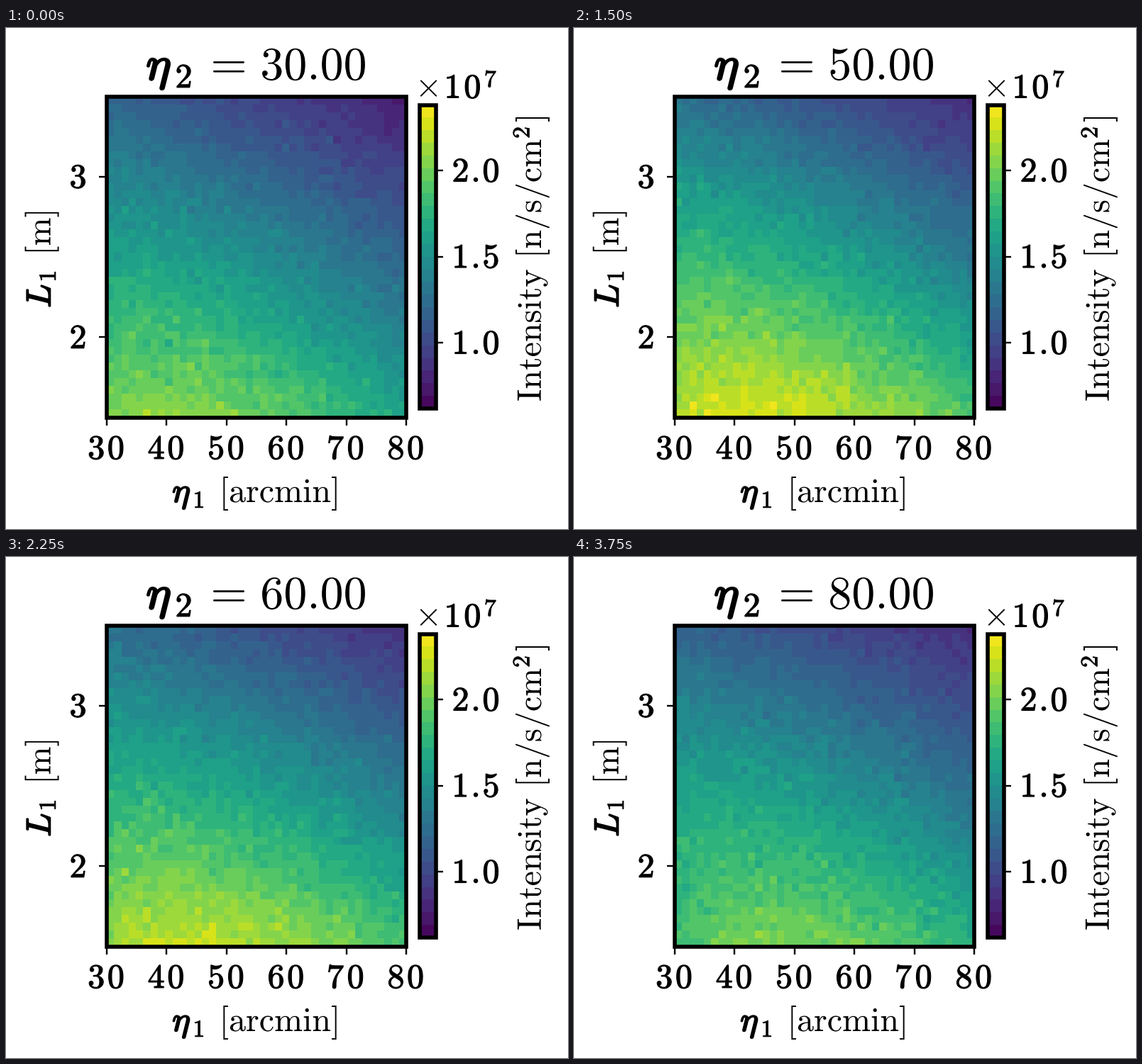
A matplotlib script that plays this animation: 792 px wide and 707 px high, repeating every 4.5 s.

```python
import matplotlib.pyplot as plt
import numpy as np
from matplotlib.animation import FuncAnimation
from matplotlib.colors import ListedColormap
from matplotlib.patches import PathPatch, Rectangle
from matplotlib.textpath import TextPath
from matplotlib.transforms import Affine2D

plt.rcParams["mathtext.fontset"] = "cm"

W, H, DPI = 792, 707, 100
PX = 72 / DPI                      # one pixel in points
EM, TITLE_EM, SUB_EM = 48, 66, 34
CELLS, BANDS = 41, 24
LEFT, RIGHT, TOP, BOTTOM = 142, 564.2, 96.5, 549.5
BAR = (583, 605.5, 108.5, 537)

# eta_2: levels along the left edge, along the right edge, height of the ridge
LEVELS = {
    30: ((.78, .565, .32), (.57, .32, .08), .11),
    40: ((.86, .63, .34), (.66, .37, .12), .12),
    50: ((.86, .66, .37), (.72, .40, .12), .13),
    60: ((.82, .62, .36), (.70, .40, .13), .13),
    70: ((.74, .58, .34), (.70, .38, .13), .13),
    80: ((.66, .55, .31), (.64, .36, .12), .15),
}
ETAS = list(LEVELS)

fig = plt.figure(figsize=(W / DPI, H / DPI), dpi=DPI, facecolor="white")
ax = fig.add_axes([0, 0, 1, 1])
ax.set_xlim(0, W)
ax.set_ylim(H, 0)
ax.axis("off")


def ink(path, stroke=0):
    return ax.add_patch(PathPatch(path, fc="black", lw=stroke * PX, zorder=4,
                                  ec="black" if stroke else "none"))


def text_path(s, x, y, size, centre=True, upward=False):
    """Text whose ink is centred on x (or y when it runs upward)."""
    path = TextPath((0, 0), f"${s}$", size=size)
    if centre:
        box = path.get_extents()
        path = path.transformed(Affine2D().translate(-(box.x0 + box.x1) / 2, 0))
    if upward:
        place = Affine2D([[0, -1, x], [-1, 0, y], [0, 0, 1]])
    else:
        place = Affine2D([[1, 0, x], [0, -1, y], [0, 0, 1]])
    return path.transformed(place)


def text(s, x, y, size=EM, stroke=0, upward=False):
    ink(text_path(s, x, y, size, upward=upward), stroke)


def roman(s, x, y, upward=False):
    text(rf"\mathrm{{{s}}}", x, y, upward=upward)


def bold(s, x, y, size=EM, upward=False):
    """Bold digits, widely set and centred on x."""
    steps = [size * (.319 if c == "." else .575) for c in s]
    pos = -sum(steps) / 2
    for c, step in zip(s, steps):
        mid = pos + step / 2
        spot = (x, y - mid) if upward else (x + mid, y)
        text(rf"\mathbf{{{c}}}", *spot, size, stroke=size / 40, upward=upward)
        pos += step


def frame_box(x0, x1, y0, y1):
    ax.add_patch(Rectangle((x0, y0), x1 - x0, y1 - y0, fill=False,
                           ec="black", lw=5.6 * PX, zorder=3))


def tick(x, y, dx, dy):
    ax.plot([x, x + dx], [y, y + dy], color="black", lw=2.4 * PX,
            solid_capstyle="butt", zorder=3)


def quadratic(levels, w):
    a, b, c = levels
    return (a * (1 - w) * (1 - 2 * w) + 4 * b * w * (1 - w)
            + c * w * (2 * w - 1))


def intensity(eta):
    left, right, ridge = LEVELS[eta]
    mid = (np.arange(CELLS) + .5) / CELLS
    u, w = np.meshgrid(mid, mid)
    v = quadratic(left, w) * (1 - u) + quadratic(right, w) * u
    v += ridge * (1 - w) ** 1.3 * np.sin(np.pi * u ** .7)
    noise = np.random.default_rng(eta).standard_normal(v.shape)
    return v + noise * (.011 + .018 * v)


def title_path(eta):
    return text_path(rf"\mathrm{{{eta:.2f}}}", 358.3, 73, TITLE_EM, centre=False)


viridis = plt.get_cmap("viridis")
cmap = ListedColormap(viridis((np.arange(BANDS) + .5) / BANDS))

mesh = ax.pcolormesh(np.linspace(LEFT, RIGHT, CELLS + 1),
                     np.linspace(BOTTOM, TOP, CELLS + 1),
                     intensity(ETAS[0]), cmap=cmap, vmin=0, vmax=1, zorder=1)
ax.pcolormesh(BAR[:2], np.linspace(BAR[3], BAR[2], BANDS + 1),
              (np.arange(BANDS)[:, None] + .5) / BANDS,
              cmap=cmap, vmin=0, vmax=1, zorder=1)
frame_box(LEFT, RIGHT, TOP, BOTTOM)
frame_box(*BAR)

# ticks and their numbers
for i in range(6):
    x = LEFT + (RIGHT - LEFT) * i / 5
    tick(x, BOTTOM, 0, 11)
    bold(str(30 + 10 * i), x - 1, 608)
for n in (2, 3):
    y = BOTTOM - (BOTTOM - TOP) * (n - 1.5) / 2
    tick(LEFT, y, -11, 0)
    bold(str(n), 101.5, y + 15.7)
for n in (1.0, 1.5, 2.0):
    y = 444 - 243 * (n - 1)
    tick(BAR[1], y, 10.5, 0)
    bold(f"{n:.1f}", 662, y + 15.7)

# scale of the bar
text(r"\times", 595.5, 97.5)
bold("10", 643.5, 98.5)
bold("7", 683, 83, SUB_EM)

# axis labels
text(r"\eta", 247, 669, stroke=2.2)
bold("1", 272, 677, SUB_EM)
roman("[arcmin]", 386, 669)

text("L", 62.5, 378, stroke=2.2, upward=True)
bold("1", 70, 350, SUB_EM, upward=True)
roman("[m]", 62.5, 287.5, upward=True)

roman("Intensity", 754, 433.5, upward=True)
roman("[n/s/cm", 754, 238.5, upward=True)
bold("2", 737.5, 147.5, SUB_EM, upward=True)
roman("]", 754, 129, upward=True)

# title
text(r"\eta", 215, 73, TITLE_EM, stroke=3)
bold("2", 250.5, 84, EM)
text("=", 314, 71.5, TITLE_EM)
value = ink(title_path(ETAS[0]))

ax.set_xlim(0, W)
ax.set_ylim(H, 0)


def update(i):
    eta = ETAS[i]
    mesh.set_array(intensity(eta))
    value.set_path(title_path(eta))
    return mesh, value


anim = FuncAnimation(fig, update, frames=len(ETAS), interval=750,
                     init_func=lambda: update(0), repeat=True, repeat_delay=0)
plt.show()
```
